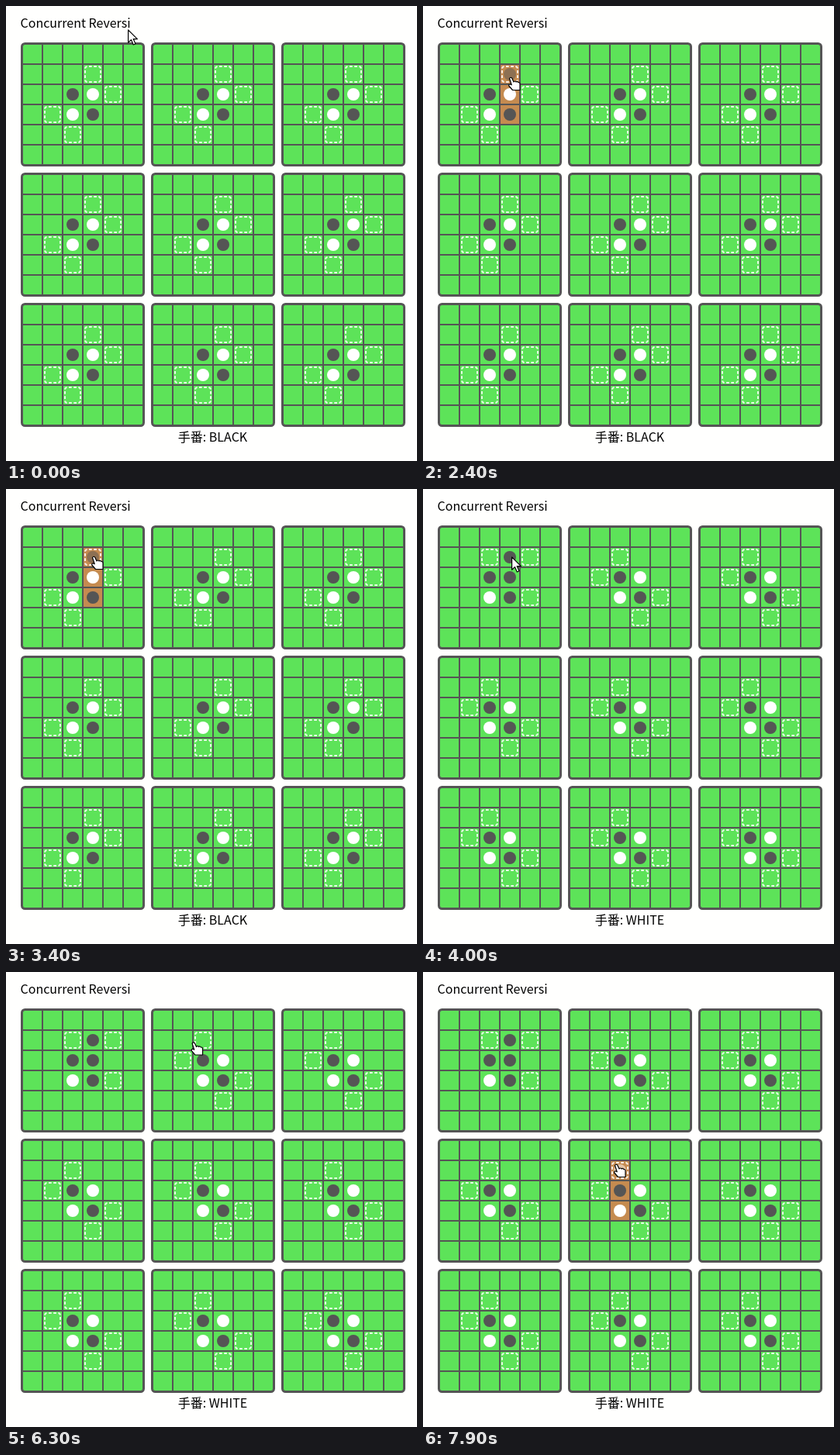
An HTML page that plays this animation: 530x587 px, repeating every 8000 ms.

```html
<!DOCTYPE html>
<html lang="ja">
<head>
<meta charset="utf-8">
<style>
  html, body { margin: 0; overflow: hidden; background: #fffffe; }
  svg { display: block; }
  text { font: 16px "Noto Sans CJK JP", "Noto Sans CJK", sans-serif; fill: #000; }
  .frame { fill: #5de359; stroke: #555; stroke-width: 3; }
  .lines { stroke: #555; stroke-width: 2; }
  .lit { fill: #c58b50; }
  .hint { fill: none; stroke: #fff; stroke-opacity: .85; stroke-width: 2; stroke-dasharray: .6 .4; stroke-dashoffset: .68; }
  .cursor { fill: #fff; stroke: #000; stroke-width: 1.2; stroke-linejoin: round; }
</style>
</head>
<body>
<svg width="530" height="587" viewBox="0 0 530 587">
  <text x="18.5" y="28">Concurrent Reversi</text>
  <g id="boards"></g>
  <text id="turn" x="266.5" y="562" text-anchor="middle"></text>
  <path id="cursor" class="cursor"/>
</svg>
<script>
const LOOP = 8000, STEP = 100, CLICK = 4000;
const SIZE = 6, CELL = 26, PITCH = 168, LEFT = 21, TOP = 49;
const COLORS = { B: '#555', W: '#fff' };
const SHAPES = {
  arrow: 'M.6 .8V17.2L4.4 13.6L7.3 20L10 18.8L7.2 12.6H12.4Z',
  hand: 'M-2.5 1.5Q-1-.8 .8 1.2L3 6Q4.5 4 6 6Q7.5 4.6 8.8 6.6Q11 6 11 9V16.5H1.5L-3.2 11Q-3.8 8.6-1.4 9L.2 9.8Z',
  beam: 'M-4-8H4V-6.5H1V6.5H4V8H-4V6.5H-1V-6.5H-4Z'
};

// Pointer moves: first step, last step, destination
const MOVES = [
  [0, 0, 157, 30], [500, 500, 159.5, 33.5], [900, 1500, 114, 87],
  [2400, 2400, 114, 92], [2500, 2800, 142, 110], [3100, 3400, 114, 87],
  [5200, 5200, 124, 87], [5400, 5500, 138, 87], [5800, 5800, 135, 89],
  [6000, 6500, 256, 91], [7300, 7700, 240, 236], [7800, 7900, 250, 248]
];

const $ = id => document.getElementById(id);
const range = n => [...Array(n).keys()];
const other = side => side === 'B' ? 'W' : 'B';
const key = (x, y) => `${x},${y}`;

// Decelerating moves; x settles sooner than y, which bends the path
function pointer(t) {
  let x = 0, y = 0;
  for (const [first, last, toX, toY] of MOVES) {
    if (t < first) break;
    const left = 1 - Math.min(1, (t - first + STEP) / (last - first + STEP));
    x = toX + (x - toX) * left ** 2;
    y = toY + (y - toY) * left ** 1.3;
  }
  return [x, y];
}

// Cells involved in a move, empty when the move is illegal
function moveCells(board, x, y, side) {
  const cells = [];
  if (board[key(x, y)]) return cells;
  for (const dx of [-1, 0, 1]) for (const dy of [-1, 0, 1]) {
    const run = [];
    let cx = x + dx, cy = y + dy;
    while ((dx || dy) && board[key(cx, cy)] === other(side)) {
      run.push([cx, cy]);
      cx += dx;
      cy += dy;
    }
    if (run.length && board[key(cx, cy)] === side) cells.push(...run, [cx, cy]);
  }
  return cells.length ? [[x, y], ...cells] : cells;
}

function makeBoards(played) {
  const boards = range(9).map(() => ({ '2,2': 'B', '3,3': 'B', '3,2': 'W', '2,3': 'W' }));
  if (played) moveCells(boards[0], 3, 1, 'B').forEach(([x, y]) => boards[0][key(x, y)] = 'B');
  return boards;
}

function hover(boards, [px, py], side) {
  const bx = Math.floor((px - LEFT) / PITCH), by = Math.floor((py - TOP) / PITCH);
  const x = Math.floor((px - LEFT - bx * PITCH) / CELL);
  const y = Math.floor((py - TOP - by * PITCH) / CELL);
  const index = by * 3 + bx;
  const inside = by >= 0 && x < SIZE && y < SIZE;
  return { index, cells: inside ? moveCells(boards[index], x, y, side) : [] };
}

const disc = (x, y, side, alpha = 1) =>
  `<circle cx="${x * CELL + 13}" cy="${y * CELL + 13}" r="8" fill="${COLORS[side]}" opacity="${alpha}"/>`;

// Square centred in a cell
const square = (name, x, y, size, extra = '') => {
  const inset = (CELL - size) / 2;
  return `<rect class="${name}" x="${x * CELL + inset}" y="${y * CELL + inset}" width="${size}" height="${size}" ${extra}/>`;
};

function drawBoard(board, index, side, lit) {
  const grid = range(SIZE - 1).map(i => (i + 1) * CELL).map(p => `M${p} 0V156M0 ${p}H156`).join('');
  let out = `<rect class="frame" x="-.5" y="-.5" width="157" height="157" rx="4"/><path class="lines" d="${grid}"/>`;
  for (const [x, y] of lit) out += square('lit', x, y, 24);
  if (lit.length) out += disc(...lit[0], side, 0.5);
  for (const y of range(SIZE)) for (const x of range(SIZE)) {
    const piece = board[key(x, y)];
    if (piece) out += disc(x, y, piece);
    else if (moveCells(board, x, y, side).length) out += square('hint', x, y, 20, 'rx="3" pathLength="12"');
  }
  const ox = LEFT + index % 3 * PITCH, oy = TOP + Math.floor(index / 3) * PITCH;
  return `<g transform="translate(${ox} ${oy})">${out}</g>`;
}

function render(t) {
  const played = t >= CLICK, side = played ? 'W' : 'B';
  const boards = makeBoards(played), at = pointer(t);
  // The highlight trails the pointer by one step
  const lit = hover(boards, pointer(Math.max(0, t - STEP)), side);
  $('boards').innerHTML = boards.map((b, i) =>
    drawBoard(b, i, side, i === lit.index ? lit.cells : [])).join('');
  $('turn').textContent = '手番: ' + (played ? 'WHITE' : 'BLACK');
  const shape = t >= 500 && t < 900 ? 'beam' : hover(boards, at, side).cells.length ? 'hand' : 'arrow';
  $('cursor').setAttribute('d', SHAPES[shape]);
  $('cursor').setAttribute('transform', `translate(${at})`);
}

const start = performance.now();
let shown = -1;
function tick() {
  const t = Math.floor((performance.now() - start) % LOOP / STEP) * STEP;
  if (t !== shown) render(shown = t);
  requestAnimationFrame(tick);
}
tick();
</script>
</body>
</html>
```
